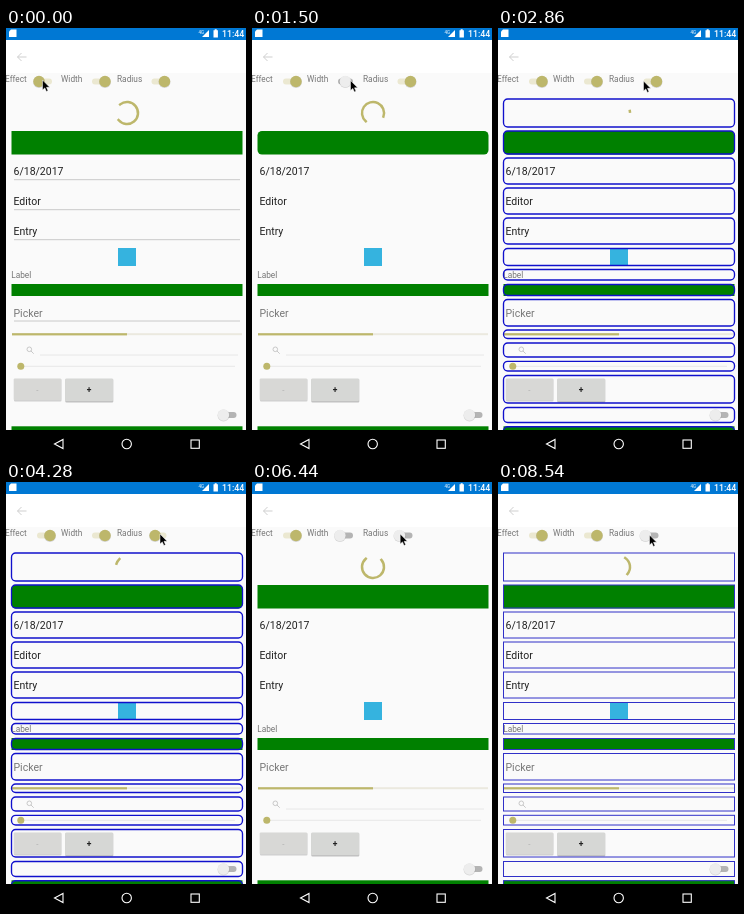
Animation, 240 px wide and 426 px high, one loop 8.56 s. Source, as an HTML page:

```html
<!DOCTYPE html>
<html lang="en">
<head>
<meta charset="utf-8">
<title>Border effect demo</title>
<style>
  html, body { margin: 0; width: 100%; height: 100%; overflow: hidden; background: #fafafa; }
  svg { display: block; width: 100vw; height: 100vh; }
  text { font-family: Roboto, "Open Sans", sans-serif; }
  .label { font-size: 8.3px; fill: #777; }
  .field { font-size: 10.5px; fill: #222; }
  .line { stroke: #bdbdbd; stroke-width: .8; }
  .faint { stroke: #e2e2e2; stroke-width: .8; }
  .icon { fill: none; stroke: #fff; stroke-width: 1.1; }
</style>
</head>
<body>
<svg id="stage" viewBox="0 0 240 426" preserveAspectRatio="none">
  <defs>
    <clipPath id="labelClip"><rect x="6" y="241.5" width="230" height="10.5" rx="4"/></clipPath>
  </defs>
  <rect width="240" height="426" fill="#fafafa"/>
  <rect y="12" width="240" height="33" fill="#fff"/>
  <rect width="240" height="12" fill="#0078d4"/>
  <path d="M5 1.5h5.5v7.500h-7.500v-5.500z" fill="#fff"/>
  <text x="192.500" y="5.500" font-size="4.500" fill="#fff">4G</text>
  <path d="M203 2v7h-7z" fill="#fff"/>
  <path d="M207.500 2.200h1.200v-1h2v1h1.200v7.300h-4.400z" fill="#fff"/>
  <text x="216" y="9.300" font-size="8.800" font-weight="500" fill="#fff">11:44</text>
  <path d="M20.500 29h-9M15.500 25l-4 4l4 4" fill="none" stroke="#cfcfcf"/>

  <text class="label" x="-1" y="54">Effect</text>
  <text class="label" x="55" y="54">Width</text>
  <text class="label" x="111" y="54">Radius</text>
  <g id="switches"></g>

  <path id="spinner" fill="none" stroke="#bdb76b" stroke-width="2.500" stroke-linecap="square"/>
  <rect id="panel" x="5.500" y="103" width="231" height="23.500" fill="#008000"/>
  <g id="underlines" class="line">
    <path d="M8 151.700H234M8 181.700H234M8 211.700H234M8 293H234"/>
  </g>
  <text class="field" x="7.500" y="147">6/18/2017</text>
  <text class="field" x="7.500" y="177">Editor</text>
  <text class="field" x="7.500" y="207">Entry</text>
  <rect x="112" y="220" width="18" height="18" fill="#35b3df"/>
  <text id="label" class="label" x="5.200" y="250">Label</text>
  <rect x="5.500" y="256" width="231" height="12" fill="#008000"/>
  <text class="field" x="7.500" y="288.500" style="fill:#777">Picker</text>
  <rect x="6" y="305.200" width="230" height="2" fill="#ebe9df"/>
  <rect x="6" y="305.200" width="115" height="2.200" fill="#bdb76b"/>
  <g fill="none" stroke="#c8c8c8"><circle cx="23.300" cy="321.300" r="2.300"/><path d="M25 323l2.700 2.700"/></g>
  <path id="searchLine" class="faint" d="M34 327H232"/>
  <path class="faint" d="M18 338.300H229"/>
  <circle cx="14.800" cy="338.300" r="3.500" fill="#bdb76b"/>
  <rect x="8" y="351" width="47.500" height="22.500" rx="1" fill="#cfcfcf"/>
  <rect x="7.700" y="350.500" width="47.500" height="21.800" rx="1" fill="#d8d8d6"/>
  <rect x="59.300" y="351" width="48" height="23.500" rx="1" fill="#c2c2c2"/>
  <rect x="59.300" y="350.500" width="47.700" height="22.500" rx="1" fill="#d6d7d5"/>
  <text x="31.300" y="364.500" font-size="8" fill="#aaa" text-anchor="middle">-</text>
  <text x="83" y="365" font-size="8.500" font-weight="700" fill="#222" text-anchor="middle">+</text>
  <rect x="5.500" y="398.300" width="231" height="12" fill="#008000"/>
  <g id="borders" fill="none"></g>

  <rect y="402" width="240" height="24" fill="#000"/>
  <path class="icon" d="M57 411.500v9l-8.500-4.500z"/>
  <circle class="icon" cx="120.700" cy="416" r="4.700"/>
  <rect class="icon" x="185" y="412" width="8.300" height="8.300"/>
  <path id="cursor" d="M0 0V10L2.300 7.900L3.900 11.500L5.500 10.800L4 7.300H7.200Z" fill="#000" stroke="#fff" stroke-width=".5"/>
</svg>
<script>
const LOOP = 8560;
const SLIDE = 150;
const byId = id => document.getElementById(id);
const clamp = v => Math.max(0, Math.min(1, v));
const smooth = v => v * v * (3 - 2 * v);

function make(parent, tag, attrs) {
  const node = document.createElementNS('http://www.w3.org/2000/svg', tag);
  set(node, attrs);
  parent.appendChild(node);
  return node;
}

function set(node, attrs) {
  for (const key in attrs) node.setAttribute(key, attrs[key]);
}

// Material standard curve, cubic-bezier(.4, 0, .2, 1)
function material(x) {
  if (x <= 0) return 0;
  if (x >= 1) return 1;
  let low = 0, high = 1;
  for (let i = 0; i < 24; i++) {
    const s = (low + high) / 2, r = 1 - s;
    if (1.2 * r * r * s + .6 * r * s * s + s * s * s < x) low = s; else high = s;
  }
  return 3 * (1 - low) * low * low + low ** 3;
}

function makeSwitch(x, y, initial, toggles) {
  const group = byId('switches');
  const track = make(group, 'rect', { x: x - 2, y: y - 3, width: 15, height: 6, rx: 3 });
  const shadow = make(group, 'circle', { cy: y + .6, r: 6, fill: '#000', opacity: .14 });
  const thumb = make(group, 'circle', { cy: y, r: 5.7 });
  const isOn = t => initial !== (toggles.filter(at => at <= t).length % 2 === 1);
  function draw(t) {
    const on = isOn(t);
    const last = toggles.filter(at => at <= t).pop();
    const moved = last === undefined ? 1 : smooth(clamp((t - last) / SLIDE));
    const cx = x + 11 * (on ? moved : 1 - moved);
    set(track, { fill: on ? '#ebe8d1' : '#b4b4b4' });
    set(thumb, { cx, fill: on ? '#bdb76b' : '#ededed' });
    set(shadow, { cx });
  }
  return { isOn, draw };
}

const effect = makeSwitch(33, 53.5, false, [0, 7385, 7720]);
const width = makeSwitch(88, 53.5, true, [1425, 2050, 5230, 8130]);
const radius = makeSwitch(147.5, 53.5, true, [2960, 4245, 6120]);
const bottom = makeSwitch(217.5, 387, false, []);
const switches = [effect, width, radius, bottom];

// top and bottom of every outlined row
const rows = [[71, 99], [103, 126], [130, 156], [160, 186], [190, 216], [220.5, 237.5],
  [241.5, 252], [256.5, 267.5], [271.5, 298], [302, 310.5], [315, 329], [333.3, 343],
  [347.5, 375], [379.5, 394.5], [398.7, 412]];
const borders = rows.map(([top, end]) =>
  make(byId('borders'), 'rect', { x: 5.5, y: top, width: 231, height: end - top }));

// time, x, y of the pointer tip
const route = [[0, 36.5, 52], [550, 37, 52], [1150, 98.5, 52.5], [2200, 98.5, 52.5],
  [2750, 145.5, 53], [2860, 145.5, 53], [3150, 154, 52], [4400, 154, 52], [5050, 99, 51],
  [5450, 99, 51], [5950, 152, 52], [6350, 152, 52], [7150, 45.5, 52], [7800, 45.5, 52],
  [8060, 98, 52], [8200, 98, 52], [8440, 151.5, 53], [LOOP, 151.5, 53]];

function drawCursor(t) {
  const i = Math.max(1, route.findIndex(stop => stop[0] > t));
  const [t0, x0, y0] = route[i - 1], [t1, x1, y1] = route[i];
  const k = smooth((t - t0) / (t1 - t0));
  set(byId('cursor'), { transform: `translate(${x0 + (x1 - x0) * k} ${y0 + (y1 - y0) * k})` });
}

function drawSpinner(t) {
  const cycle = t * .0012525 + 4.45;
  const phase = cycle % 1;
  const base = 144 * cycle + 90 * phase;
  const tail = base + 270 * material(phase * 2 - 1);
  const head = Math.max(base + 270 * material(phase * 2), tail + .5);
  const point = deg => {
    const a = deg * Math.PI / 180;
    return `${(121 + 11 * Math.sin(a)).toFixed(3)} ${(85 - 11 * Math.cos(a)).toFixed(3)}`;
  };
  const large = head - tail > 180 ? 1 : 0;
  set(byId('spinner'), { d: `M${point(tail)}A11 11 0 ${large} 1 ${point(head)}` });
}

function render(t) {
  switches.forEach(item => item.draw(t));
  const active = effect.isOn(t - 40);
  const outlined = active && width.isOn(t);
  const round = active && radius.isOn(t);
  set(byId('panel'), { rx: round ? 4.5 : 0 });
  set(byId('underlines'), { visibility: active ? 'hidden' : 'visible' });
  set(byId('searchLine'), { visibility: outlined ? 'hidden' : 'visible' });
  set(byId('label'), { 'clip-path': outlined && round ? 'url(#labelClip)' : 'none' });
  set(byId('borders'), {
    visibility: outlined ? 'visible' : 'hidden',
    stroke: round ? '#1010cc' : '#3030c8',
    'stroke-width': round ? 1.35 : 1
  });
  borders.forEach(box => set(box, { rx: round ? 4.2 : 0 }));
  drawSpinner(t);
  drawCursor(t);
}

const start = performance.now();
function tick() {
  render((performance.now() - start) % LOOP);
  requestAnimationFrame(tick);
}
tick();
</script>
</body>
</html>
```
